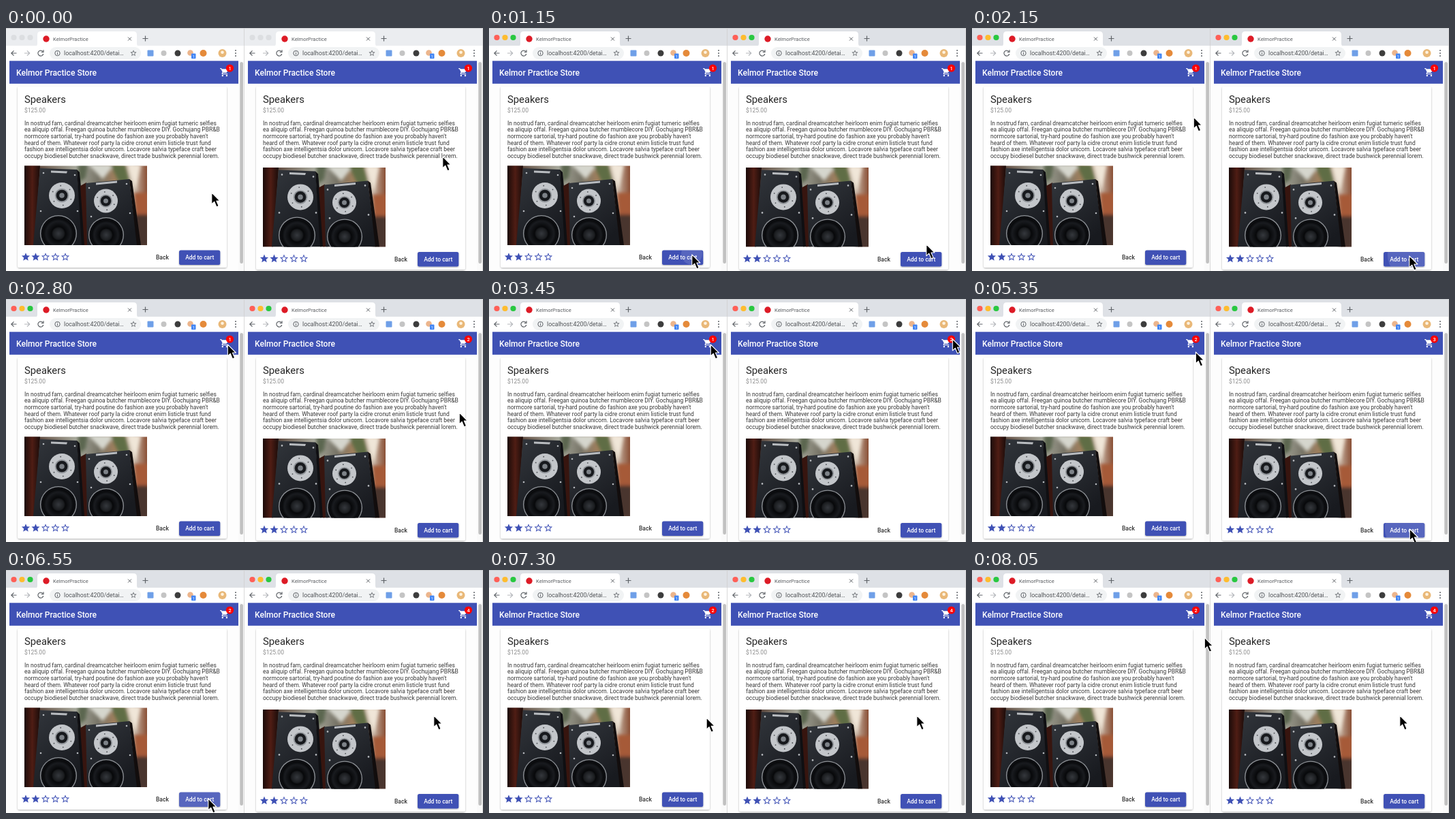
These frames come from a looping animation (700x357 px, 8150 ms). An HTML page:

```html
<!DOCTYPE html>
<html lang="en">
<head>
<meta charset="utf-8">
<title>Store demo</title>
<style>
html, body { margin: 0; width: 100%; height: 100%; overflow: hidden; background: #fff; }
svg { display: block; width: 100vw; height: 100vh; font-family: Roboto, Arial, sans-serif; }
</style>
</head>
<body>
<svg id="stage" viewBox="0 0 700 357">
  <defs>
    <linearGradient id="room">
      <stop offset="0" stop-color="#3a1a13"/><stop offset=".2" stop-color="#75675b"/>
      <stop offset=".42" stop-color="#a9aa9d"/><stop offset=".6" stop-color="#777467"/>
      <stop offset=".75" stop-color="#a5805c"/><stop offset=".88" stop-color="#cfc3b4"/>
      <stop offset="1" stop-color="#8a5036"/>
    </linearGradient>
    <linearGradient id="wood">
      <stop offset="0" stop-color="#1b0b09"/><stop offset=".5" stop-color="#4f1d14"/><stop offset="1" stop-color="#1a0c0a"/>
    </linearGradient>
    <linearGradient id="face" x2=".6" y2="1">
      <stop offset="0" stop-color="#32363c"/><stop offset="1" stop-color="#181a1f"/>
    </linearGradient>
    <radialGradient id="cone">
      <stop offset="0" stop-color="#35383d"/><stop offset=".35" stop-color="#1b1d20"/>
      <stop offset=".45" stop-color="#07080a"/><stop offset=".8" stop-color="#191b1f"/><stop offset="1" stop-color="#060709"/>
    </radialGradient>
    <filter id="blur"><feGaussianBlur stdDeviation="2.5"/></filter>
    <filter id="lift" x="-20%" y="-20%" width="140%" height="160%">
      <feDropShadow dx="0" dy="1" stdDeviation="1" flood-opacity=".3"/>
    </filter>
    <clipPath id="photoClip"><rect x="27" y="202.6" width="180" height="116.4"/></clipPath>
    <clipPath id="buttonClip"><rect x="254" y="326.5" width="60.3" height="21.5" rx="2.5"/></clipPath>
    <path id="starFull" d="M12 17.27 18.18 21l-1.64-7.03L22 9.24l-7.19-.61L12 2 9.19 8.63 2 9.24l5.46 4.73L5.82 21z"/>
    <path id="starLine" d="M22 9.24l-7.19-.62L12 2 9.19 8.63 2 9.24l5.46 4.73L5.82 21 12 17.27 18.18 21l-1.63-7.03zM12 15.4l-3.76 2.27 1-4.28-3.32-2.88 4.38-.38L12 6.1l1.71 4.04 4.38.38-3.32 2.88 1 4.28z"/>
    <path id="cart" d="M7 18c-1.1 0-1.99.9-1.99 2S5.9 22 7 22s2-.9 2-2-.9-2-2-2zM1 2v2h2l3.6 7.59-1.35 2.45c-.16.28-.25.61-.25.96 0 1.1.9 2 2 2h12v-2H7.42c-.14 0-.25-.11-.25-.25l.03-.12.9-1.63h7.45c.75 0 1.41-.41 1.75-1.03l3.58-6.49A1 1 0 0 0 20 4H5.21l-.94-2zm16 16c-1.1 0-1.99.9-1.99 2s.89 2 1.99 2 2-.9 2-2-.9-2-2-2z"/>
    <path id="arrow" d="M.3 .8V17.8L4.2 14.2 7.4 21.8 10.6 20.4 7.4 13H12.4Z" fill="#000" stroke="#fff" stroke-width="1.1" stroke-linejoin="round"/>
  </defs>
</svg>
<script>
const LOOP = 8150;
const FOCUS_AT = 300;
const stage = document.getElementById('stage');
const BLUE = '#3f51b5';

const paragraph = [
  'In nostrud fam, cardinal dreamcatcher heirloom enim fugiat tumeric selfies',
  'ea aliquip offal. Freegan quinoa butcher mumblecore DIY. Gochujang PBR&amp;B',
  "normcore sartorial, try-hard poutine do fashion axe you probably haven't",
  'heard of them. Whatever roof party la cidre cronut enim listicle trust fund',
  'fashion axe intelligentsia dolor unicorn. Locavore salvia typeface craft beer',
  'occupy biodiesel butcher snackwave, direct trade bushwick perennial lorem.'
];

// Cursor keys are [time, x, y]; badge steps are [time, count].
const panes = [
  {
    x: 0, shift: 0, bottom: 352,
    path: [[0, 301.5, 241], [150, 301.5, 241], [800, 297.5, 332], [1400, 297.5, 332], [2100, 325, 130],
      [2250, 325, 130], [2750, 325, 66], [4000, 325, 66], [4500, 328, 77], [5450, 328, 77],
      [6150, 296.5, 335], [6850, 296.5, 335], [7750, 341, 98.5], [LOOP, 341, 98.5]],
    badge: [[0, 1], [3700, 2]], clicks: [1120, 6300]
  },
  {
    x: 350, shift: 2.4, bottom: 355,
    path: [[0, 640.5, 188], [300, 640.5, 188], [950, 641.5, 317], [1500, 641.5, 317], [1850, 641.5, 334],
      [2400, 641.5, 334], [3100, 680, 58], [4200, 680, 58], [4950, 642, 337], [5800, 642, 337],
      [6350, 627.5, 213], [LOOP, 627.5, 213]],
    badge: [[0, 1], [2200, 2], [5250, 3], [5650, 4]], clicks: [2020, 5180, 5600]
  }
];

const circle = (x, y, r, fill, more = '') => `<circle cx="${x}" cy="${y}" r="${r}" fill="${fill}" ${more}/>`;
const rect = (x, y, w, h, fill, more = '') =>
  `<rect x="${x}" y="${y}" width="${w}" height="${h}" fill="${fill}" ${more}/>`;
const label = (x, y, size, fill, text, more = '') =>
  `<text x="${x}" y="${y}" font-size="${size}" fill="${fill}" ${more}>${text}</text>`;
const line = (d, color = '#5f6368', width = 1.2) =>
  `<path d="${d}" fill="none" stroke="${color}" stroke-width="${width}"/>`;
const lights = colors => colors.map((c, i) => circle(11.5 + i * 12, 14, 4.1, c)).join('');

function browserBar() {
  return rect(0, 0, 350, 27, '#dee1e6') +
    lights(['#ff5f57', '#febc2e', '#28c840']) +
    `<g class="inactive">${rect(0, 0, 350, 27, '#ebedf0')}${lights(['#dcdee1', '#dcdee1', '#dcdee1'])}</g>` +
    rect(0, 0, 350, .8, '#c9cbce') +
    `<path d="M42 27q4 0 4-4V10q0-5 5-5H187q5 0 5 5V23q0 4 4 4z" fill="#fff"/>` +
    circle(59, 16, 4.7, '#dd1b26') +
    label(69, 18.8, 7.6, '#5a5d61', 'KelmorPractice') +
    line('M179 13.5l5 5m0-5l-5 5', '#5f6368', 1) + line('M200.5 15.5h8m-4-4v8') +
    rect(0, 26, 350, 22, '#fff') +
    line('M15.5 37H8m3.5-3.7L7.8 37l3.7 3.7') +
    line('M27 37h7.5m-3.5-3.7L34.7 37 31 40.7', '#b5b8bc') +
    line('M54 34.5a4 4 0 1 0 .8 3.5M55 32.3v3.2h-3.3') +
    rect(64, 28, 134, 18, '#f1f3f4', 'rx="9"') +
    circle(75.5, 37, 3.7, 'none', 'stroke="#5f6368"') + line('M75.5 36.4v2.8m0-4.7v1', '#5f6368', 1) +
    label(85, 40.2, 8.9, '#505357', 'localhost:4200/detai…') +
    `<use href="#starLine" transform="translate(181.5 31.3) scale(.46)" fill="#5f6368"/>` +
    rect(207.5, 32.5, 9, 9, '#6f9fe8', 'rx="1"') +
    circle(231.5, 37, 4, '#c4c4c4') + circle(252, 37, 4.5, '#3d3d3d') +
    circle(270.5, 36.5, 4.3, '#ecb58c') + rect(272, 37.5, 6.5, 7.5, '#4285f4', 'rx="1"') +
    label(275.2, 43.5, 5.5, '#fff', '1', 'text-anchor="middle"') +
    circle(289.5, 37, 5, '#e58a3a') +
    circle(317.5, 37, 6, '#e9b878') + circle(317.5, 35.8, 2.3, '#fff3e0') +
    [33, 37, 41].map(y => circle(337, y, 1, '#5f6368')).join('');
}

function tweeter(x, y, r) {
  const screw = i => circle(x + r * .76 * Math.cos(i * 1.047 + .4), y + r * .76 * Math.sin(i * 1.047 + .4), .9, '#4a4d52');
  return circle(x, y, r, '#c3c6ca') + circle(x, y, r * .54, '#8f9398') +
    circle(x, y, r * .44, '#17191d') + circle(x, y, r * .2, '#7d8288') + [0, 1, 2, 3, 4, 5].map(screw).join('');
}

const woofer = (x, y, r) =>
  circle(x, y, r, '#8f9398') + circle(x, y, r * .95, '#0d0e11') + circle(x, y, r * .84, 'url(#cone)');

function photo() {
  const screws = points => points.map(([x, y]) => circle(x, y, 1.3, '#b5b8bc')).join('');
  return `<g clip-path="url(#photoClip)">` + rect(27, 202, 180, 117, 'url(#room)') +
    `<g filter="url(#blur)">` +
    `<path d="M106 200h14l-3 20-11 8z" fill="#5c6650"/><path d="M120 200l22 22 18-22z" fill="#d5d6cd"/>` +
    `<path d="M153 200h22l8 32-18-6z" fill="#5f6d45"/><path d="M178 200l12 40 8-40z" fill="#f0e6d8"/>` +
    `<path d="M188 242h22v34h-20z" fill="#a65a38"/><path d="M188 274h22v48h-22z" fill="#4a352e"/></g>` +
    `<path d="M27 202H50L42 319H27z" fill="url(#wood)"/>` +
    `<path d="M50 206 104 208 113 319H40z" fill="url(#face)"/>` +
    `<path d="M66 209.5 90 210.5 89 213.5 66 212.5z" fill="#b9bcc0"/>` +
    `<path d="M104 208 108 212 118 319H111z" fill="#0f0f12"/>` +
    `<path d="M109 232 118 227 123 319H115z" fill="#37150f"/>` +
    `<path d="M117 228 181 222 193 319H119z" fill="url(#face)"/>` +
    `<path d="M132 227.5 163 224.5 163 227.5 132 230.5z" fill="#b9bcc0"/>` +
    `<path d="M181 222 185 225 198 319H192z" fill="#120d0d"/>` +
    tweeter(82, 246, 19) + tweeter(146.5, 254, 17.5) + woofer(77, 302, 27) + woofer(147, 304, 26) +
    screws([[55, 213], [101, 216], [51, 269], [105, 269], [122, 235], [177, 229], [125, 277], [182, 272]]) +
    '</g>';
}

function pageContent({ shift, bottom }) {
  const stars = [0, 1, 2, 3, 4].map(i =>
    `<use href="#${i < 2 ? 'starFull' : 'starLine'}" transform="translate(${21.7 + i * 14.5} 329) scale(.607)" fill="${BLUE}"/>`).join('');
  return rect(0, 48, 350, 309, '#fdfdfd') +
    rect(5, 48.3, 336, 33.5, BLUE) +
    label(15, 69.5, 12.1, '#fff', 'Kelmor Practice Store', 'font-weight="500"') +
    `<use href="#cart" transform="translate(313.6 57.8) scale(.607)" fill="#fff"/>` +
    circle(328.5, 59, 5.6, '#f00') +
    label(328.5, 61.7, 7.4, '#fff', '1', 'class="count" text-anchor="middle" font-weight="500"') +
    rect(341, 48, 9, 309, '#fafafa') + rect(343.3, 50, 4.7, 296, '#c1c1c1', 'rx="2.3"') +
    rect(17, 86, 307, bottom - 86, '#fff', 'rx="2.4" filter="url(#lift)"') +
    label(27, 109.7, 14.8, '#262626', 'Speakers') +
    label(27, 123.5, 8.5, '#8a8a8a', '$125.00') +
    paragraph.map((text, i) => label(27, 142.6 + i * 9.65, 8.5, '#383838', text)).join('') +
    `<g transform="translate(0 ${shift})">` + photo() + stars +
    label(220, 340.3, 8.5, '#333', 'Back', 'font-weight="500"') +
    rect(254, 326.5, 60.3, 21.5, BLUE, 'rx="2.5" filter="url(#lift)"') +
    `<g clip-path="url(#buttonClip)">${circle(0, 0, 0, '#fff', 'class="ripple"')}</g>` +
    label(284.2, 340.3, 8.5, '#fff', 'Add to cart', 'font-weight="500" text-anchor="middle"') + '</g>';
}

stage.insertAdjacentHTML('beforeend', panes.map(pane =>
  `<g class="pane" transform="translate(${pane.x} 0)">${pageContent(pane)}${browserBar()}` +
  `${rect(349.2, 0, .8, 357, '#d0d0d0')}</g>`).join('') +
  panes.map(() => '<use href="#arrow" class="cursor"/>').join(''));

const cursors = stage.querySelectorAll('.cursor');
stage.querySelectorAll('.pane').forEach((node, i) => Object.assign(panes[i], {
  cursor: cursors[i],
  count: node.querySelector('.count'),
  ripple: node.querySelector('.ripple'),
  inactive: node.querySelector('.inactive')
}));

const clamp = v => Math.max(0, Math.min(1, v));
const ease = v => v * v * (3 - 2 * v);

function pointAt(path, t) {
  const next = path.findIndex(key => key[0] > t);
  const [t0, x0, y0] = path[next - 1], [t1, x1, y1] = path[next];
  const k = ease((t - t0) / (t1 - t0));
  return [x0 + (x1 - x0) * k, y0 + (y1 - y0) * k];
}

function draw(t) {
  for (const pane of panes) {
    const { path, badge, clicks, cursor, count, ripple, inactive } = pane;
    cursor.setAttribute('transform', `translate(${pointAt(path, t)})`);
    count.textContent = badge.filter(step => step[0] <= t).pop()[1];
    inactive.setAttribute('visibility', t < FOCUS_AT ? 'visible' : 'hidden');

    const click = clicks.filter(time => time <= t).pop() ?? -LOOP;
    const age = t - click;
    const [x, y] = pointAt(path, Math.max(0, click));
    ripple.setAttribute('cx', x - pane.x);
    ripple.setAttribute('cy', y - pane.shift);
    ripple.setAttribute('r', 48 * Math.sqrt(clamp(age / 300)));
    ripple.setAttribute('opacity', .12 * (1 - clamp((age - 250) / 300)));
  }
}

function tick(now) {
  draw(now % LOOP);
  requestAnimationFrame(tick);
}
draw(0);
requestAnimationFrame(tick);
</script>
</body>
</html>
```
